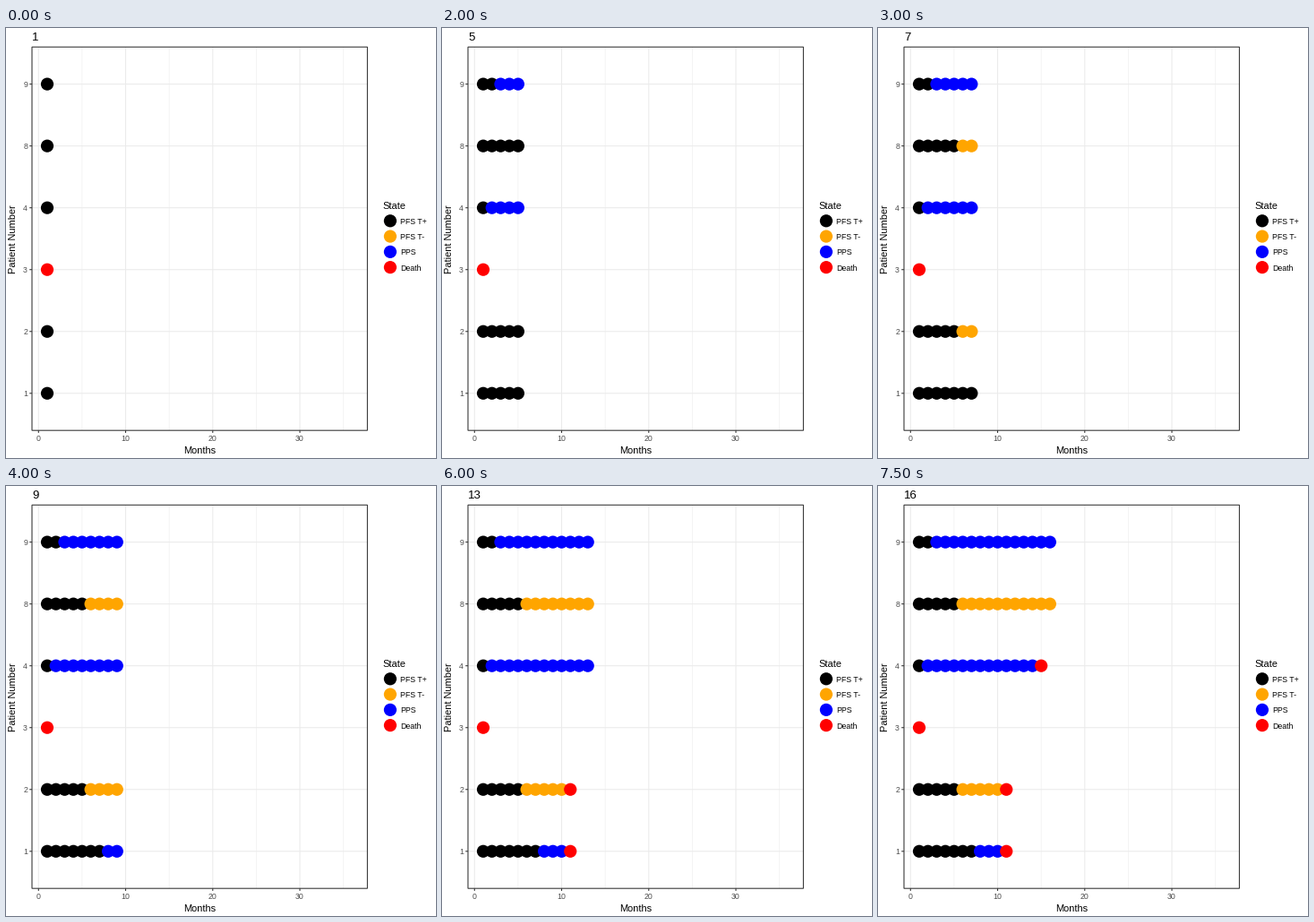
Animation of 480 by 480 pixels, one loop 8 s. Source, as a matplotlib script:

```python
import matplotlib.pyplot as plt
from matplotlib.animation import FuncAnimation
from matplotlib.patches import Circle, Rectangle

SIZE, DPI = 480, 72
MONTHS, STEP = 16, 500
LEFT, RIGHT, TOP, BOTTOM = 29.0, 403.4, 21.2, 449.2
RADIUS = 7.1
GRID, DARK, TICK_TEXT = "#ebebeb", "#333333", "#4d4d4d"

STATES = {"PFS T+": "black", "PFS T-": "orange", "PPS": "blue", "Death": "red"}
# Patient: (first month, state) for each change of state
PATIENTS = {
    9: [(1, "PFS T+"), (3, "PPS")],
    8: [(1, "PFS T+"), (6, "PFS T-")],
    4: [(1, "PFS T+"), (2, "PPS"), (15, "Death")],
    3: [(1, "Death")],
    2: [(1, "PFS T+"), (6, "PFS T-"), (11, "Death")],
    1: [(1, "PFS T+"), (8, "PPS"), (11, "Death")],
}

plt.rcParams["font.family"] = "Liberation Sans"
fig = plt.figure(figsize=(SIZE / DPI, SIZE / DPI), dpi=DPI, facecolor="white")
ax = fig.add_axes([0, 0, 1, 1])
ax.set_xlim(0, SIZE)
ax.set_ylim(SIZE, 0)
ax.axis("off")


def month_x(month):
    return LEFT + (month + 0.75) * (RIGHT - LEFT) / 38.5


def row_y(i):
    return TOP + (i + 0.6) * (BOTTOM - TOP) / 6.2


def line(xs, ys, color, width, z):
    ax.plot(xs, ys, color=color, lw=width, zorder=z, snap=False,
            solid_capstyle="butt")


def label(x, y, text, size, color="black", ha="left", **kw):
    return ax.text(x, y, text, fontsize=size, color=color, ha=ha,
                   va="baseline", zorder=10, **kw)


def dot(x, y, color, z):
    return ax.add_patch(Circle((x, y), RADIUS, fc=color, ec="none", zorder=z))


def state_at(changes, month):
    return [state for start, state in changes if start <= month][-1]


def draw_panel():
    for month in range(0, 36, 5):
        x = month_x(month)
        major = month % 10 == 0
        line([x, x], [TOP, BOTTOM], GRID, 1.07 if major else 0.53, 1)
        if major:
            line([x, x], [BOTTOM, BOTTOM + 2.75], DARK, 1.07, 1)
            label(x, 461, str(month), 8.8, TICK_TEXT, "center")
    for i, patient in enumerate(PATIENTS):
        y = row_y(i)
        line([LEFT, RIGHT], [y, y], GRID, 1.07, 1)
        line([LEFT - 2.75, LEFT], [y, y], DARK, 1.07, 1)
        label(24, y + 3.4, str(patient), 8.8, TICK_TEXT, "right")
    ax.add_patch(Rectangle((LEFT, TOP), RIGHT - LEFT, BOTTOM - TOP, fill=False,
                           ec=DARK, lw=1.07, zorder=9, snap=False,
                           joinstyle="miter"))
    label((LEFT + RIGHT) / 2, 475, "Months", 11, ha="center")
    ax.text(13, (TOP + BOTTOM) / 2, "Patient Number", fontsize=11, rotation=90,
            ha="right", va="center", rotation_mode="default")


def draw_legend():
    label(420, 202, "State", 11)
    for i, (name, color) in enumerate(STATES.items()):
        y = 215.3 + 17.28 * i
        dot(428.9, y, color, 2)
        label(440, y + 3.5, name, 8.8)


def make_dots():
    dots = []
    for i, changes in enumerate(PATIENTS.values()):
        for month in range(1, MONTHS + 1):
            state = state_at(changes, month)
            color = STATES[state]
            dots.append((month, dot(month_x(month), row_y(i), color, 2 + month / 100)))
            if state == "Death":
                break
    return dots


draw_panel()
draw_legend()
dots = make_dots()
title = label(29, 14, "1", 13.2)


def update(frame):
    now = frame + 1
    title.set_text(str(now))
    for month, patch in dots:
        patch.set_visible(month <= now)
    return [title] + [patch for _, patch in dots]


anim = FuncAnimation(fig, update, frames=MONTHS, interval=STEP,
                     repeat=True, repeat_delay=0, blit=False)
plt.show()
```
